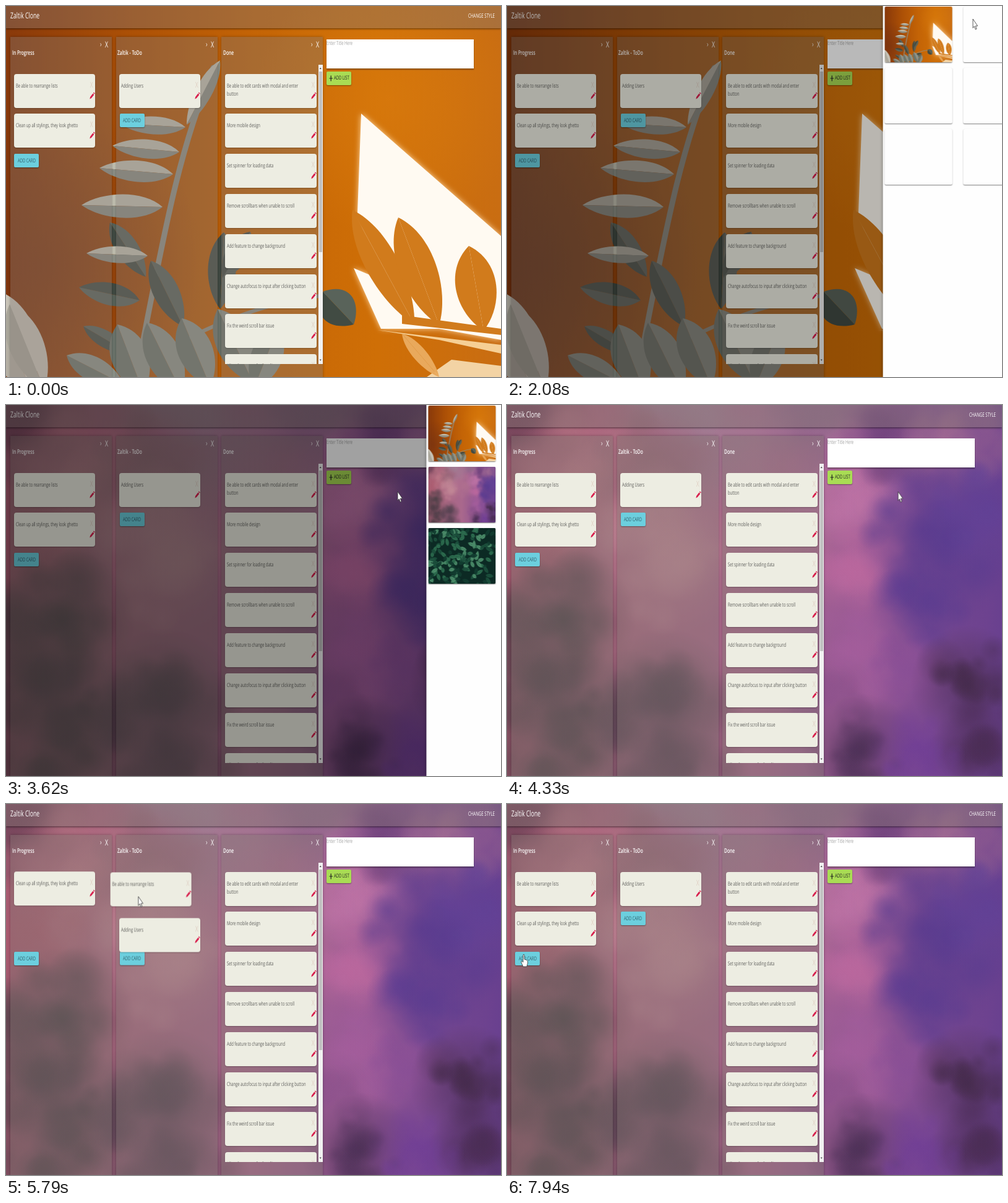
Animation, 800 px wide and 600 px high, one loop 8000 ms. Source, as an HTML page with a canvas:

```html
<!DOCTYPE html>
<html lang="en">
<head>
<meta charset="utf-8">
<title>Board</title>
<style>
  html, body { margin: 0; width: 100%; height: 100%; overflow: hidden; }
  #stage { position: relative; width: 800px; height: 600px; overflow: hidden; background: #b9610c; font-family: "Open Sans", sans-serif; }
  #stage div, #stage canvas, #stage svg { position: absolute; }
  /* The screen is shown narrower than it was laid out: one ratio for all text. */
  .t { white-space: nowrap; line-height: 13px; transform: scaleX(.653); transform-origin: 0 0; text-rendering: geometricPrecision; }
  #head { width: 800px; height: 36px; background: rgba(128,118,115,.42); box-shadow: 0 1px 3px rgba(0,0,0,.55); }
  .col { top: 50px; width: 164px; height: 560px; background: rgba(128,118,112,.4); box-shadow: 0 0 4px rgba(0,0,0,.3); }
  .card { height: 55px; background: #edede2; border-radius: 4px; box-shadow: 0 1px 2px rgba(0,0,0,.25); }
  .btn { width: 40px; height: 22px; border-radius: 2px; background: #6ccfde; box-shadow: 0 1px 2px rgba(0,0,0,.4); }
  #list { left: 348px; top: 95px; width: 157px; height: 484px; overflow: hidden; }
  #bar { left: 505px; top: 95px; width: 6.5px; height: 484px; background: #f1f1f1; }
  #thumb { top: 11px; left: .5px; width: 5.5px; height: 292px; background: #c1c1c1; }
  #input { left: 518px; top: 54px; width: 237.5px; height: 47px; background: #fff; box-shadow: 0 2px 2px rgba(0,0,0,.35); }
  #dim { width: 800px; height: 600px; background: rgba(0,0,0,.5); opacity: 0; }
  #panel { left: 560px; width: 240px; height: 600px; background: #fefefe; box-shadow: 0 0 5px rgba(0,0,0,.4); }
  .pic { width: 109px; height: 90px; border-radius: 2px; background: #fefefe; box-shadow: 0 1px 1.5px rgba(0,0,0,.5); overflow: hidden; }
  #cursor svg { overflow: visible; left: 0; top: 0; width: 1px; height: 1px; }
</style>
</head>
<body>
<div id="stage"></div>
<script>
const LOOP = 8000;
const stage = document.getElementById('stage');

// ---------- helpers ----------
function box(parent, cls, x, y, w, id) {
  const el = document.createElement('div');
  if (cls) el.className = cls;
  if (id) el.id = id;
  if (x != null) el.style.left = x + 'px';
  if (y != null) el.style.top = y + 'px';
  if (w != null) el.style.width = w + 'px';
  parent.append(el);
  return el;
}
function text(parent, x, mid, str, size = 14, color = '#5f5f5c', weight = 400) {
  const el = box(parent, 't', x, mid - 7);
  el.innerHTML = str;
  el.style.cssText += `;font-size:${size * .638}px;color:${color};font-weight:${weight}`;
  return el;
}
function canvas(parent, w, h, paint) {
  const c = document.createElement('canvas');
  c.width = w; c.height = h;
  parent.append(c);
  const g = c.getContext('2d');
  g.scale(w / 800, h / 600);
  paint(g);
  return c;
}
function random(seed) {
  return () => {
    seed = seed + 0x6D2B79F5 | 0;
    let n = Math.imul(seed ^ seed >>> 15, 1 | seed);
    n = n + Math.imul(n ^ n >>> 7, 61 | n) ^ n;
    return ((n ^ n >>> 14) >>> 0) / 4294967296;
  };
}

// ---------- pictures, all painted on an 800 x 600 field ----------
function half(g, x1, y1, x2, y2, w, fill) {
  const len = Math.hypot(x2 - x1, y2 - y1), nx = -(y2 - y1) / len * w, ny = (x2 - x1) / len * w;
  g.fillStyle = fill;
  g.beginPath();
  g.moveTo(x1, y1);
  g.bezierCurveTo(x1 + (x2 - x1) * .25 + nx, y1 + (y2 - y1) * .25 + ny,
    x1 + (x2 - x1) * .75 + nx * .8, y1 + (y2 - y1) * .75 + ny * .8, x2, y2);
  g.fill();
}
function leaf(g, x1, y1, x2, y2, w, a, b = a) {
  half(g, x1, y1, x2, y2, w * .67, a);
  half(g, x1, y1, x2, y2, -w * .67, b);
}
function glow(g, x, y, r, rgb, alpha) {
  const f = g.createRadialGradient(x, y, 0, x, y, r);
  f.addColorStop(0, `rgba(${rgb},${alpha})`);
  f.addColorStop(.5, `rgba(${rgb},${alpha * .55})`);
  f.addColorStop(1, `rgba(${rgb},0)`);
  g.fillStyle = f;
  g.fillRect(x - r, y - r, 2 * r, 2 * r);
}
function fillAll(g, ...stops) {
  const f = g.createLinearGradient(0, 0, 800, 0);
  stops.forEach((c, i) => f.addColorStop(stops.length > 1 ? i / (stops.length - 1) : 0, c));
  g.fillStyle = f;
  g.fillRect(0, 0, 800, 600);
}
function polygon(g, fill, ...pts) {
  g.fillStyle = fill;
  g.beginPath();
  for (let i = 0; i < pts.length; i += 2) g.lineTo(pts[i], pts[i + 1]);
  g.fill();
}

function paintOrange(g) {
  fillAll(g, '#89390a', '#ac5006', '#c46406', '#cf6f06', '#c96d12');
  glow(g, 620, 150, 220, '222,128,16', .5);
  glow(g, 60, 420, 260, '110,46,20', .5);
  g.shadowColor = '#ffd6a0';
  g.shadowBlur = 10;
  polygon(g, '#fffaf2', 574, 174, 640, 232, 800, 372, 800, 540, 700, 522, 606, 522, 562, 424, 600, 440, 568, 335);
  g.shadowBlur = 0;
  const shade = '#d17b1c';
  leaf(g, 560, 330, 660, 515, 58, shade);
  leaf(g, 634, 342, 700, 516, 66, shade);
  leaf(g, 748, 388, 772, 525, 72, shade);
  polygon(g, shade, 640, 500, 800, 522, 800, 532, 640, 514);
  polygon(g, '#f6cf95', 600, 524, 800, 548, 800, 562, 700, 540);
  polygon(g, '#f3d3a4', 680, 600, 720, 572, 800, 582, 800, 600);
  leaf(g, 640, 530, 700, 600, 24, '#e9a95c');

  g.strokeStyle = '#8f9084';
  g.lineCap = 'round';
  g.lineWidth = 9;
  g.beginPath();
  g.moveTo(335, 100);
  g.bezierCurveTo(285, 220, 262, 330, 218, 560);
  g.stroke();
  g.lineWidth = 6;
  g.beginPath();
  g.moveTo(515, 468);
  g.quadraticCurveTo(400, 480, 270, 550);
  g.stroke();
  const pale = [
    [346, 88, 292, 192, 30], [290, 196, 184, 190, 32], [280, 236, 172, 226, 34], [270, 272, 151, 262, 38],
    [253, 325, 122, 322, 42], [229, 404, 130, 400, 30]
  ];
  const dark = [
    [168, 350, 226, 438, 40], [234, 412, 286, 518, 46], [216, 476, 118, 455, 40], [125, 518, 200, 562, 30],
    [352, 366, 346, 490, 50], [395, 365, 350, 440, 40], [512, 462, 562, 515, 64], [440, 505, 345, 540, 44]
  ];
  const low = [
    [180, 515, 222, 625, 66], [228, 512, 284, 625, 62], [284, 505, 330, 615, 62], [342, 490, 400, 610, 64],
    [440, 520, 400, 620, 56], [98, 565, 190, 612, 44]
  ];
  for (const l of dark) leaf(g, ...l, '#414b43', '#59635a');
  for (const l of pale) leaf(g, ...l, '#c3c1b2', '#8d9086');
  for (const l of low) leaf(g, ...l, '#6c756c', '#8d9389');
  leaf(g, -30, 455, 40, 620, 96, '#b5b0a4', '#c9c4b8');
  leaf(g, 6, 482, 62, 620, 62, '#aaa79b', '#c6c2b6');
}

function paintPurple(g) {
  const rnd = random(7);
  fillAll(g, '#a1586f', '#ab6882', '#a9688d', '#8b5290', '#69408f');
  const clouds = [
    [30, 30, 90, '112,66,88'], [330, 20, 120, '160,128,150'], [520, 15, 90, '145,106,138'], [110, 120, 110, '186,118,134'],
    [30, 220, 90, '172,92,112'], [240, 90, 90, '152,102,120'], [255, 235, 110, '196,138,152'], [90, 350, 95, '72,62,68'],
    [50, 450, 95, '82,62,72'], [120, 500, 80, '74,60,70'], [60, 590, 90, '84,64,74'], [255, 480, 95, '84,66,80'], [260, 570, 100, '90,66,84'],
    [440, 200, 120, '176,112,144'], [560, 130, 95, '192,116,166'], [560, 270, 80, '186,104,158'], [620, 60, 70, '112,66,124'],
    [715, 55, 85, '158,104,146'], [780, 50, 60, '136,86,142'], [700, 215, 110, '86,58,142'], [770, 180, 80, '98,66,150'],
    [680, 320, 80, '92,60,144'], [580, 400, 85, '164,94,156'], [650, 430, 60, '136,78,150'], [745, 450, 75, '68,42,74'],
    [770, 550, 70, '74,44,84'], [570, 560, 75, '76,48,86'], [660, 560, 65, '112,62,150'], [520, 470, 60, '142,82,140']
  ];
  for (const [x, y, r, rgb] of clouds) {
    glow(g, x, y, r * 1.25, rgb, .55);
    for (let i = 0; i < 22; i++) {
      const a = rnd() * 6.283, d = rnd() * r;
      glow(g, x + Math.cos(a) * d, y + Math.sin(a) * d, r * (.2 + rnd() * .4), rgb, .32);
    }
  }
}

function bokeh(base, colors, seed, size) {
  return g => {
    const rnd = random(seed);
    fillAll(g, ...base);
    for (let i = 0; i < 60; i++) {
      g.globalAlpha = .2 + rnd() * .35;
      g.fillStyle = colors[i % colors.length];
      g.beginPath();
      g.arc(rnd() * 800, 600 * rnd(), size * (.5 + rnd()), 0, 7);
      g.fill();
    }
    g.globalAlpha = 1;
  };
}
function paintPark(g) {
  fillAll(g, '#8a8a68', '#d6d4c4', '#cfc9ac', '#6d6a36');
  polygon(g, '#eeeee8', 100, 300, 480, 240, 560, 600, 0, 600, 0, 470);
  polygon(g, '#3d3a1c', 0, 0, 800, 0, 800, 130, 560, 90, 380, 150, 180, 110, 0, 300);
  polygon(g, '#8c8742', 620, 240, 800, 160, 800, 600, 700, 600);
  polygon(g, '#a9a9a0', 500, 250, 600, 300, 690, 600, 560, 600);
  g.fillStyle = '#d4b430';
  for (let i = 0; i < 7; i++) g.fillRect(220 + i * 75, 130 + i % 3 * 40, 36, 40);
}
function paintGreen(g) {
  const rnd = random(11);
  fillAll(g, '#0c2a24');
  for (let i = 0; i < 170; i++) {
    const x = rnd() * 800, y = rnd() * 600, a = rnd() * 6.283, l = 50 + rnd() * 50;
    const c = ['#1c4f3c', '#2c6b4e', '#123c30', '#4a8a68'][i % 4];
    leaf(g, x, y, x + Math.cos(a) * l, y + Math.sin(a) * l, 44, c);
  }
}

// ---------- board ----------
canvas(stage, 800, 600, paintOrange);
const purple = canvas(stage, 800, 600, paintPurple);
purple.style.opacity = 0;

const head = box(stage, '', 0, 0, null, 'head');
text(head, 7, 16, 'Zaltik Clone', 20.8, '#fff');
text(head, 747, 16, 'CHANGE STYLE', 14.7, '#fff');

['In Progress', 'Zaltik - ToDo', 'Done'].forEach((name, i) => {
  const col = box(stage, 'col', 7 + i * 170.5, 50);
  text(col, 2.5, 26, name, 16, '#fff', 600);
  text(col, 145, 11.5, '›', 20, '#fff');
  text(col, 153, 13, 'X', 21, '#fff');
});

function card(parent, x, y, w, label) {
  const el = box(parent, 'card', x, y, w);
  text(el, 3, 19, label);
  text(el, w - 8, 18, 'X', 20, '#d8bfb2', 300);
  el.insertAdjacentHTML('beforeend', `<svg style="left:${w - 9}px;top:29px" width="9" height="12">
    <path d="M.4 11.6 1 8.2 5.3 2.4 7.4 4.4 3 10.1ZM5.9 1.7 6.8.6 8.8 2.5 8 3.6Z" fill="#d81f4d"/></svg>`);
  return el;
}
function button(x, y) {
  const el = box(stage, 'btn', x, y);
  text(el, 5.5, 11, 'ADD CARD', 14, '#33606c');
  return el;
}

const list = box(stage, '', null, null, null, 'list');
['Be able to edit cards with modal and enter<br>button', 'More mobile design', 'Set spinner for loading data',
  'Remove scrollbars when unable to scroll', 'Add feature to change background',
  'Change autofocus to input after clicking button', 'Fix the weird scroll bar issue', 'Allow Comments for Deadlines']
  .forEach((s, i) => card(list, 5.5, 14.5 + i * 64.8, 148.5, s));

const bar = box(stage, '', null, null, null, 'bar');
box(bar, '', null, null, null, 'thumb');
bar.insertAdjacentHTML('beforeend', `<svg width="7" height="484" fill="#505050">
  <path d="M1.7 7 3.2 4.5 4.7 7ZM1.7 476.5 3.2 479 4.7 476.5Z"/></svg>`);

const input = box(stage, '', null, null, null, 'input');
text(input, 0, 6, 'Enter Title Here', 14, '#a3a3a3');
const add = box(stage, 'btn', 518, 105.5);
add.style.background = '#a9dc54';
text(add, 12, 10.5, 'ADD LIST', 14, '#222');
add.insertAdjacentHTML('beforeend', '<svg width="14" height="22"><path d="M4.5 11H10M7.2 6.5V15.5" stroke="#222" stroke-width="1.2"/></svg>');

const btn1 = button(13, 239), btn2 = button(183.5, 174.3);
const adding = card(stage, 183.3, 109.5, 131, 'Adding Users');
const clean = card(stage, 12.8, 174.3, 131, 'Clean up all stylings, they look ghetto');
const moved = card(stage, 12.8, 109.5, 131, 'Be able to rearrange lists');

const dim = box(stage, '', 0, 0, null, 'dim');
const panel = box(stage, '', null, null, null, 'panel');
const late = [
  paintOrange,
  bokeh(['#1d5f9c', '#3878c0', '#6a4cb8'], ['#35b4dc', '#5aa0e8', '#2586c4', '#8a6ad8'], 3, 75),
  paintPurple, paintPark, paintGreen,
  bokeh(['#3a1206', '#2a1408', '#6a4a08'], ['#e8c23c', '#d8661c', '#8a3a10', '#f4e08a', '#2c1408'], 9, 62)
].map((paint, i) => {
  const pic = box(panel, 'pic', 3 + i % 2 * 127, 1 + (i >> 1) * 99);
  return canvas(pic, 109, 90, paint);
}).slice(1);

// ---------- pointer ----------
const cursor = box(stage, '', 0, 0, null, 'cursor');
cursor.innerHTML = ['M0 0V14.5L2.4 11.8 4.2 17 6 16 4.3 11.2H7.6Z',
  'M-1 1Q0-1 1 1V8L5 9.5Q7 10 6.5 14L5 20H-1L-4 13Q-4.5 10.5-2.5 11.5L-1 13Z',
  'M-4.5 0Q-3.5-2-2.5 0L-3-6Q-2-8-1.2-6L-.6-8Q.6-9.6 1.2-7.6L2.2-7.2Q3.2-8 3.4-5.6L4.2-4.6Q5.2-4 4.8 1L3.4 9H-2Z']
  .map(d => `<svg><path d="${d}" fill="#fff" stroke="#333" stroke-width=".8"/></svg>`).join('') +
  '<svg><ellipse rx="6" ry="10" fill="#fff000" fill-opacity=".6"/></svg>';
const [arrow, hand, grab, press] = cursor.children;

// ---------- motion ----------
const now = document.timeline.currentTime || 0;
const OUT = 'cubic-bezier(.25,.46,.45,.94)', HARD = 'steps(1, end)';

// steps: [time, value, easing to the next step]
function animate(el, prop, steps, easing = 'linear') {
  const all = [[0, steps[0][1]], ...steps, [LOOP, steps[steps.length - 1][1]]];
  const frames = all.map(([t, v, e]) => ({ offset: t / LOOP, [prop]: v, easing: e || easing }));
  el.animate(frames, { duration: LOOP, iterations: Infinity }).startTime = now;
}
const move = (el, steps) => animate(el, 'translate', steps.map(([t, x, y, e]) => [t, `${x}px ${y}px`, e]));
const slideY = (el, steps) => move(el, steps.map(([t, y, e]) => [t, 0, y, e]));
// Shown only inside the given [from, to] spans.
const show = (el, ...spans) => animate(el, 'opacity',
  [[0, 0], ...spans.flatMap(([a, b]) => [[a, 1], [b, 0]])], HARD);

const drag1 = [[5200, 0, 0], [5300, 6, -2], [5420, 52, -14], [5540, 118, -9], [5640, 146, 1], [5720, 148, 4]];
const drag2 = [[6860, 170.5, 0], [6935, 116, -8], [7010, 43, -6.5], [7090, 12, -4], [7170, 4, 2], [7260, 4, 3]];
const follow = (path, x, y) => path.map(([t, dx, dy]) => [t, 12.8 + dx + x, 109.5 + dy + y]);

move(moved, [...drag1, [5790, 155.5, .5], [5960, 170.5, 0], ...drag2, [7480, 0, 0]]);
move(cursor, [
  [460, 796, 610], [830, 747, 124], [1310, 747, 124, OUT], [1540, 751, 29], [1760, 751, 29], [1900, 753, 21],
  [2540, 753, 21], [2840, 712, 97], [3300, 633, 140, OUT], [4330, 633, 140], [4680, 330, 166], [5020, 66, 146],
  ...follow(drag1, 53, 36), [6020, 214, 150, OUT], [6780, 241, 129], ...follow(drag2, 57.5, 19),
  [7710, 74.5, 131.5, OUT], [7920, 27, 243]
]);
slideY(clean, [[5400, 0, OUT], [5600, -64.8], [6890, -64.8], [7010, .8, OUT], [7100, 9.7], [7500, 9.7, HARD], [7501, 0]]);
slideY(adding, [[5430, 0, OUT], [5630, 74.5], [6020, 74.5, HARD], [6021, 64.8], [6880, 64.8, OUT], [7010, .3], [7030, 0]]);
slideY(btn1, [[6020, 0, HARD], [6021, -64.8], [6890, -64.8], [7010, -12, OUT], [7080, 0]]);
slideY(btn2, [[5430, 0, OUT], [5610, 64.6], [7500, 64.6, HARD], [7501, 0]]);

move(panel, [[1945, 250, 0, OUT], [2195, 0, 0], [3560, 0, 0, OUT], [3790, 250, 0]]);
animate(dim, 'opacity', [[1945, 0], [2195, 1], [3560, 1], [3790, 0]]);
show(purple, [3540, LOOP - 1]);
late.forEach(c => show(c, [2240, LOOP - 1]));

show(hand, [1500, 1940], [7840, LOOP - 1]);
show(grab, [4960, 5720], [6150, 7260]);
show(arrow, [1, 1500], [1940, 4960], [5720, 6150], [7260, 7840]);
show(press, [1690, 1800], [3470, 3560], [5170, 5720], [6860, 7260]);
</script>
</body>
</html>
```
